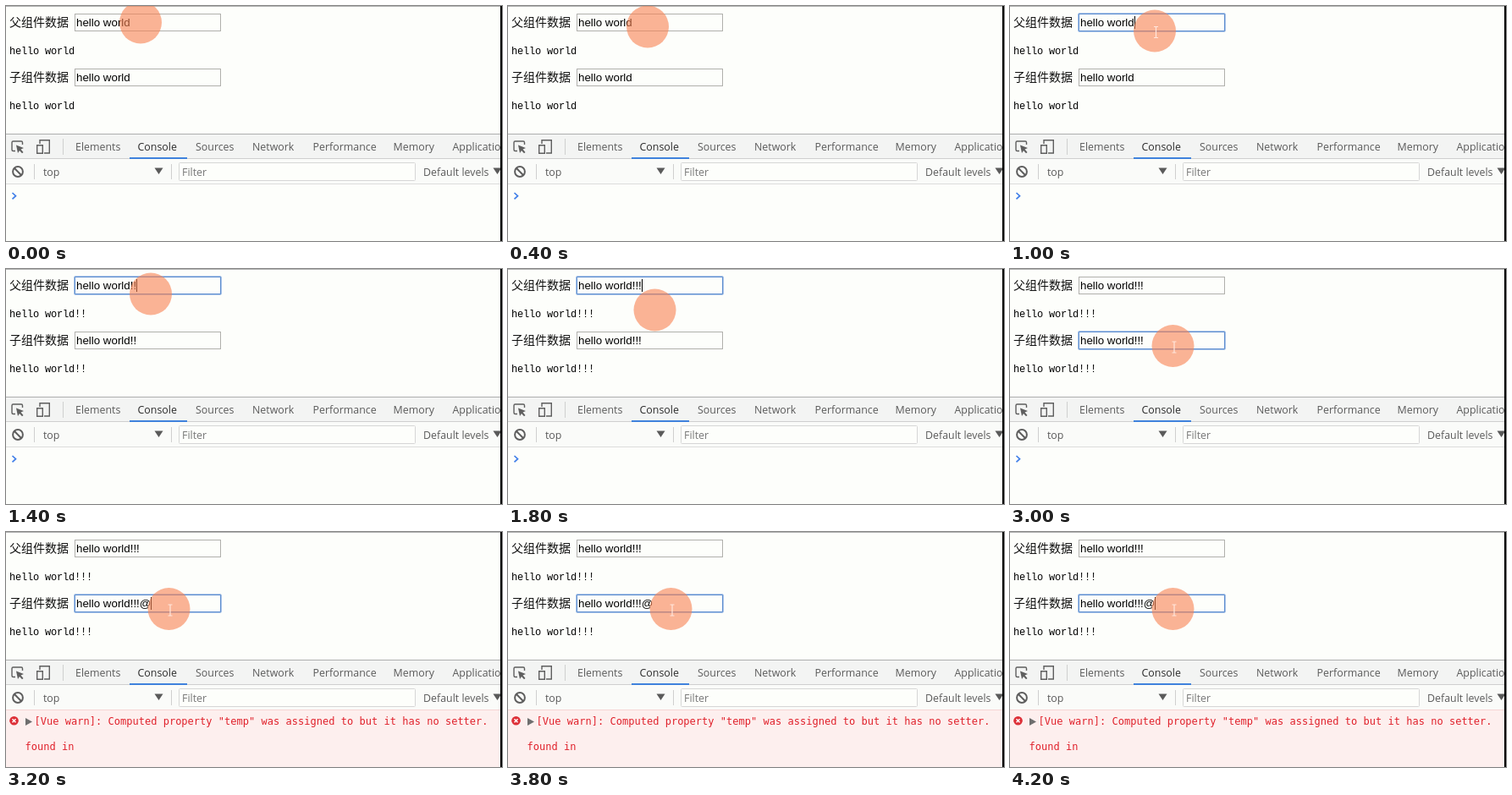
These frames come from a looping animation (586 px wide and 278 px high, 4.4 s). An HTML page:

```html
<!DOCTYPE html>
<html lang="zh-CN">
<head>
<meta charset="utf-8">
<title>Computed property demo</title>
<style>
html, body { margin: 0; width: 100%; height: 100%; overflow: hidden; background: #fdfefb; }
svg { display: block; }
text { white-space: pre; }
.label { font: 14px "Noto Sans CJK SC", "Noto Sans CJK", sans-serif; fill: #111; }
.echo { font: 12px "Liberation Mono", monospace; letter-spacing: -.2px; fill: #000; }
.value { font: 13.33px "Liberation Sans", Arial, sans-serif; fill: #000; }
.ui { font: 12.4px "Open Sans", sans-serif; fill: #5a5a5a; }
.ui .on { fill: #2c2c2c; }
.log { font: 12px "DejaVu Sans Mono", monospace; letter-spacing: .02px; fill: #e0202a; }
.icon { fill: none; stroke: #5e5e5e; stroke-width: 1.4; }
</style>
</head>
<body>
<svg width="586" height="278" viewBox="0 0 586 278">
  <rect width="586" height="278" fill="#fdfefb"/>
  <rect width="584" height="1" fill="#b4b4b4"/>

  <g class="label">
    <text x="4" y="24">父组件数据</text>
    <text x="4" y="89">子组件数据</text>
  </g>
  <g id="fields"></g>

  <rect y="151" width="584" height="30" fill="#f3f4f3"/>
  <rect y="181" width="584" height="30" fill="#fafbf9"/>
  <g fill="#cfcfcf">
    <rect y="151" width="584" height="1" fill="#aeaeae"/>
    <rect y="180" width="584" height="1"/>
    <rect y="210" width="584" height="1" fill="#dcdcdc"/>
    <rect x="67" y="157" width="1" height="19"/>
    <rect x="33" y="187" width="1" height="18"/>
    <rect x="195" y="187" width="1" height="18"/>
  </g>
  <rect x="146" y="179" width="68" height="2" fill="#3f82dc"/>

  <g class="icon">
    <path d="M11 171.500H8.500Q7 171.500 7 170V161.500Q7 160 8.500 160H18Q19.500 160 19.500 161.500V164"/>
    <path d="M12 164.500L21 168L17.500 169.500L20.500 173L19 174.300L16 171L14 174Z" fill="#5e5e5e" stroke="none"/>
    <path d="M40 163V158.700H51.300V174H45M36.700 164.700H43.300V174.300H36.700Z"/>
    <path d="M18.200 200.200L9.800 191.800" stroke-width="2"/>
    <circle cx="14" cy="196" r="5.900" stroke-width="2"/>
  </g>
  <path d="M175.500 191.500H185.500L180.500 199ZM575.500 191.500H585.500L580.500 199Z" fill="#5a5a5a"/>
  <rect x="204.500" y="185.500" width="279" height="21" rx="1" fill="#fdfefb" stroke="#d6d6d6"/>

  <g class="ui">
    <g id="tabs"></g>
    <text x="44" y="200.500">top</text>
    <text x="208" y="200.500" style="fill:#777">Filter</text>
    <text x="493" y="200.500">Default levels</text>
  </g>

  <path id="prompt" d="M7.500 221L11.500 224.700L7.500 228.400" fill="none" stroke="#3f7ee8" stroke-width="1.700"/>
  <g id="error">
    <rect y="211" width="584" height="67" fill="#fdefee"/>
    <rect y="210" width="584" height="1" fill="#f6d4d4"/>
    <circle cx="9.500" cy="223.300" r="5.300" fill="#dd3038"/>
    <path d="M7.500 221.300L11.500 225.300M11.500 221.300L7.500 225.300" stroke="#fff" stroke-width="1.500"/>
    <path d="M23 220L31 224.500L23 229Z" fill="#6e6e6e"/>
    <g class="log">
      <text x="33.500" y="228">[Vue warn]: Computed property "temp" was assigned to but it has no setter.</text>
      <text x="22.500" y="258">found in</text>
    </g>
  </g>

  <g id="pointer">
    <circle r="25" fill="#f98252" opacity=".6"/>
    <path id="beam" d="M-1 -5H4M1.500 -5V8M-1 8H4" fill="none" stroke="#ffe6dc" stroke-width="1.200"/>
  </g>
  <rect x="584" width="2" height="278" fill="#000"/>
</svg>
<script>
const LOOP = 4400, STEP = 200;
const $ = id => document.getElementById(id);

function add(parent, tag, attrs, text = "") {
  const el = document.createElementNS("http://www.w3.org/2000/svg", tag);
  for (const key in attrs) el.setAttribute(key, attrs[key]);
  el.textContent = text;
  parent.append(el);
  return el;
}

const tabs = { Elements: 82, Console: 155.5, Sources: 224, Network: 291, Performance: 362.5, Memory: 457.5, Application: 527.5 };
for (const name in tabs)
  add($("tabs"), "text", { x: tabs[name], y: 171, class: name === "Console" ? "on" : "" }, name);

const makeField = y => ({
  box: add($("fields"), "rect", { x: 81.5, y: y + .5, width: 172, height: 20, fill: "#fdfefb" }),
  ring: add($("fields"), "rect", { x: 80.5, y: y - .5, width: 174, height: 22, rx: 1.5, fill: "none", stroke: "#a8c3e8" }),
  value: add($("fields"), "text", { x: 83, y: y + 15, class: "value" }),
  caret: add($("fields"), "rect", { y: y + 3, width: 1, height: 15 }),
  echo: add($("fields"), "text", { x: 4, y: y + 48, class: "echo" })
});
const fields = [makeField(9), makeField(74)];

// advance widths in em, for the caret
const EM = 13.33, TEXT_W = 4.779, BANG_W = .278, AT_W = 1.015;

// pointer stops: time, x, y
const stops = [[0, 159, 19.5], [800, 171, 29.5], [1600, 171, 29.5], [1800, 173.5, 48.5], [2000, 185, 76], [2200, 192.5, 91], [LOOP, 192.5, 91]];
function pointerAt(t) {
  const i = stops.findIndex(s => s[0] > t);
  const [a, b] = [stops[i - 1], stops[i]];
  const k = (t - a[0]) / (b[0] - a[0]);
  return [1, 2].map(n => a[n] + (b[n] - a[n]) * k);
}

const show = (el, on) => el.setAttribute("visibility", on ? "visible" : "hidden");

function draw(time) {
  const t = Math.floor(time % LOOP / STEP) * STEP;
  const bangs = Math.max(0, Math.min(3, Math.floor((t - 1000) / 200)));
  const warned = t >= 3200;
  const active = t < 600 ? -1 : t < 2400 ? 0 : 1;
  const text = "hello world" + "!".repeat(bangs);

  // each click or key restarts the caret's blink
  const since = t - [600, 1200, 1400, 1600, 2400, 3200].filter(k => k <= t).pop();
  const lit = since % 1000 < (warned ? 400 : 600);

  fields.forEach((f, i) => {
    const on = i === active, typed = i === 1 && warned;
    f.box.setAttribute("stroke", on ? "#5f8fd0" : "#b0b0ac");
    show(f.ring, on);
    show(f.caret, on && lit);
    f.value.textContent = text + (typed ? "@" : "");
    f.echo.textContent = text;
    const w = TEXT_W + bangs * BANG_W + (typed ? AT_W : 0);
    f.caret.setAttribute("x", Math.round(83 + w * EM));
  });

  const [x, y] = pointerAt(t);
  $("pointer").setAttribute("transform", `translate(${x} ${y})`);
  show($("beam"), (t >= 600 && t < 1200) || t >= 2000);
  show($("error"), warned);
  show($("prompt"), !warned);
}

let start;
function tick(now) {
  start ??= now;
  draw(Math.max(0, now - start));
  requestAnimationFrame(tick);
}
draw(0);
requestAnimationFrame(tick);
</script>
</body>
</html>
```
